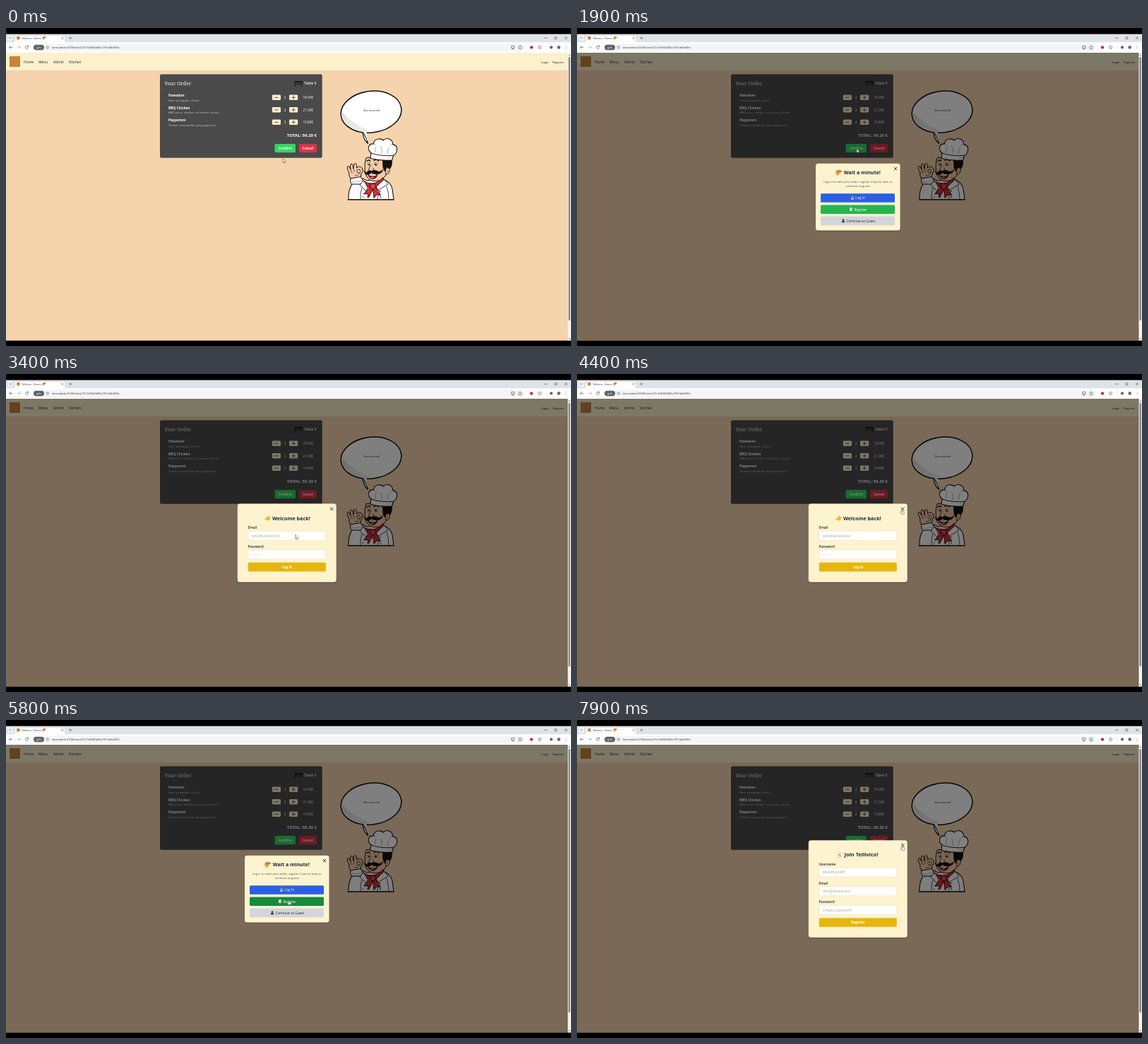
These frames come from a looping animation (800 by 450 pixels, 8 s). An HTML page:

```html
<!DOCTYPE html>
<html lang="en">
<head>
<meta charset="utf-8">
<title>Pizza order</title>
<style>
html, body { margin: 0; width: 100%; height: 100%; overflow: hidden; background: #000; }
svg { display: block; width: 800px; height: 450px; }
text { font-family: "Open Sans", "Noto Sans", sans-serif; white-space: pre; }
.serif { font-family: "Noto Serif", serif; }
.i { font-style: italic; }
</style>
</head>
<body>
<svg id="stage" viewBox="0 0 800 450" xmlns="http://www.w3.org/2000/svg"></svg>
<script>
const LOOP = 8000;
const INK = '#1f2937';

const rect = (x, y, w, h, fill, r = 0, extra = '') =>
  `<rect x="${x}" y="${y}" width="${w}" height="${h}" rx="${r}" fill="${fill}" ${extra}/>`;
const dot = (x, y, r, fill, extra = '') => `<circle cx="${x}" cy="${y}" r="${r}" fill="${fill}" ${extra}/>`;
const shape = (d, fill, stroke = '#111', w = 0.9) =>
  `<path d="${d}" fill="${fill}" stroke="${stroke}" stroke-width="${w}" stroke-linejoin="round" stroke-linecap="round"/>`;
const line = (d, stroke = '#111', w = 0.7) => shape(d, 'none', stroke, w);
const text = (x, y, size, str, fill = '#111', weight = 400, anchor = 'start', cls = '') =>
  `<text x="${x}" y="${y}" font-size="${size}" fill="${fill}" font-weight="${weight}" text-anchor="${anchor}" class="${cls}">${str}</text>`;
const cross = (x, y, r, w, color = '#222') =>
  line(`M${x - r} ${y - r}l${2 * r} ${2 * r}m0 ${-2 * r}l${-2 * r} ${2 * r}`, color, w);

// Buttons that react to the pointer
const buttons = [];
function button(view, x, y, w, h, base, hover, label = '') {
  buttons.push({ id: 'b' + buttons.length, view, x, y, w, h, base, hover });
  return rect(x, y, w, h, base, 1.6, `id="b${buttons.length - 1}"`) + label;
}
function closeButton(view, x, y) {
  return button(view, x - 3, y - 3, 6, 6, 'transparent', 'transparent') + cross(x, y, 2, 0.85);
}

// Small pictograms
const slice = (x, y, s) => `<g transform="translate(${x} ${y}) scale(${s})">` +
  shape('M-4 -1 Q0 -5 4 -2 L-2 4Z', '#f3b33f', '#b5651d', 0.8) +
  line('M-4 -1 Q0 -5 4 -2', '#b5651d', 1.5) + dot(0, -1, 0.9, '#c8322b') + dot(-1.4, 1.4, 0.7, '#c8322b') + '</g>';
const wave = (x, y) => shape(`M${x - 3} ${y + 1}L${x - 1} ${y - 1}L${x + 2} ${y - 3.2}L${x + 3.5} ${y - 1}
  L${x + 3} ${y + 2}Q${x} ${y + 4.5} ${x - 3} ${y + 1}Z`, '#f8c233', '#c98b17', 0.4) +
  line(`M${x} ${y}l2.4 -2M${x + 0.8} ${y + 1}l2.4 -1.6`, '#c98b17', 0.35);
const cook = (x, y) => shape(`M${x - 2.8} ${y + 4}Q${x} ${y + 0.5} ${x + 2.8} ${y + 4}Z`, '#f4f4f4', '#999', 0.3) +
  dot(x, y, 2, '#f6c04a') + shape(`M${x - 2} ${y - 1}l-.4 -2q2.4 -2 4.8 0l-.4 2Z`, '#fff', '#999', 0.3) +
  dot(x + 1.6, y + 2.2, 0.7, '#d03b32');
const lock = (x, y) => line(`M${x - 1.2} ${y}v-1.3a1.2 1.2 0 0 1 2.4 0v1.3`, '#cfd5dc', 0.6) +
  rect(x - 1.9, y - 0.4, 3.8, 2.9, '#f2a93b', 0.4);
const memo = (x, y) => rect(x - 1.8, y - 2.4, 3.6, 4.8, '#f3f3f3', 0.3) +
  line(`M${x - 1} ${y - 1}h2M${x - 1} ${y}h2`, '#888', 0.3) + line(`M${x} ${y + 1.8}l2 -2.4`, '#e0533d', 0.7);
const bust = (x, y) => dot(x, y - 1.2, 1.3, '#333b48') +
  shape(`M${x - 2.4} ${y + 2.4}q0 -2.4 2.4 -2.4t2.4 2.4Z`, '#333b48', 'none', 0);

function browser() {
  let s = rect(0, 8.5, 800, 434, '#fff') + rect(0, 8.5, 800, 11.7, '#dfe2e6');
  s += rect(2, 10.2, 8, 8, '#eef0f3', 2) + line('M5 13.6l1.2 1.2 1.2 -1.2', '#333', 0.6);
  s += shape('M11 20.2q2 0 2 -2v-5q0 -2 2 -2h66q2 0 2 2v5q0 2 2 2Z', '#fff', 'none', 0);
  s += rect(15.2, 12, 4.4, 4.4, '#c8843c') + text(22.3, 15.7, 3.75, 'Tellivico - Demo', '#333') + slice(54, 14.2, 0.55);
  s += cross(80, 14.2, 1.2, 0.5, '#444') + line('M89.4 14.2h3.6m-1.8 -1.8v3.6', '#444', 0.5);
  s += line('M762.5 14.2h3.4', '#222', 0.5) + rect(777, 12.8, 2.8, 2.8, 'none', 0.4, 'stroke="#222" stroke-width=".5"');
  s += cross(793, 14.2, 1.5, 0.5);
  s += line('M9 27.4H4.8m1.9 -2l-2 2 2 2', '#444', 0.6) + line('M16 27.4h4.2m-1.9 -2l2 2 -2 2', '#9a9a9a', 0.6);
  s += line('M31.3 26a2.2 2.2 0 1 0 .4 1.8M31.6 24.8v1.5h-1.5', '#444', 0.6);
  s += rect(37, 22.4, 697, 10.2, '#f2f4f6', 5.1) + rect(39, 23.8, 15, 7.4, '#5f6368', 3.7);
  s += text(46.5, 28.8, 4, 'gifs', '#fff', 400, 'middle');
  s += dot(58.8, 27.4, 1.9, 'none', 'stroke="#555" stroke-width=".45"') + line('M58.8 27.2v1.1M58.8 26.3v.1', '#555', 0.45);
  s += text(65, 28.9, 3.95, 'demotable:4100/ticket/27c1b8340d92e75f1a6b830e', '#333');
  s += rect(715.6, 25.4, 4.2, 3.2, 'none', 0.4, 'stroke="#333" stroke-width=".6"') + line('M716.7 29.9h2', '#333', 0.6);
  s += shape('M728 24.9l.8 1.8 1.9 .2 -1.4 1.3 .4 1.9 -1.7 -1 -1.7 1 .4 -1.9 -1.4 -1.3 1.9 -.2Z', 'none', '#444', 0.5);
  s += dot(744, 27.4, 2.2, '#d3262f') + dot(755.6, 27.4, 2, 'none', 'stroke="#555" stroke-width=".7"');
  s += line('M764 24.5v6', '#ccd', 0.4) + dot(772, 27.4, 2.1, '#6a6259') + dot(782.7, 27.4, 2.3, '#5669a5');
  s += [25.5, 27.4, 29.3].map(y => dot(793, y, 0.45, '#333')).join('');
  return s;
}

function scrollbar() {
  return rect(795.5, 35, 4.5, 407.5, '#f4f4f4') + rect(796.5, 41, 2.4, 373, '#858585', 1.2) +
    shape('M796.5 39l1.2 -1.8 1.2 1.8Z', '#777', 'none', 0) + shape('M796.5 439l1.2 1.8 1.2 -1.8Z', '#777', 'none', 0);
}

function orderCard() {
  const rows = [['Hawaiian', 'Ham, pineapple, cheese', '18.40€'],
    ['BBQ Chicken', 'BBQ sauce, chicken, red onions, cheese', '21.00€'],
    ['Pepperoni', 'Tomato, mozzarella, spicy pepperoni', '19.80€']];
  let s = rect(218, 65.5, 229.7, 118.2, '#4a4a4a', 2);
  s += text(224.5, 80.9, 7.1, 'Your Order', '#f5f5f5', 500, 'start', 'serif');
  s += rect(408, 75.3, 12, 2, '#151515', 0.5) + line('M410 77l-.8 5.2M418 77l.8 5.2M409.7 79.4h8.6', '#151515', 0.9);
  s += text(422, 80.4, 5.2, 'Table 5', '#f5f5f5', 600);
  rows.forEach(([name, note, price], i) => {
    const y = i * 17.5;
    s += text(230, 97.2 + y, 4.8, name, '#fff', 700) + text(230, 103.6 + y, 4.2, note, '#c9c9c9', 400, 'start', 'i');
    s += rect(376.8, 94.6 + y, 12.2, 7.4, '#fcefcb', 1.4) + rect(401, 94.6 + y, 12.2, 7.4, '#fcefcb', 1.4);
    s += line(`M380.6 ${98.3 + y}h4.6M404.9 ${98.3 + y}h4.4m-2.2 -2.2v4.4`, '#3f4658', 0.9);
    s += text(395, 100.2 + y, 4.8, '2', '#fff', 400, 'middle') + text(420.4, 100.1 + y, 4.7, price, '#fff');
  });
  s += text(440, 154.3, 6, 'TOTAL: 59.20 €', '#fff', 700, 'end');
  s += button('order', 380.5, 164, 29.5, 12.2, '#30d961', '#25b34c', text(395.3, 171.8, 4.75, 'Confirm', '#fff', 700, 'middle'));
  s += button('order', 415, 164, 25, 12.2, '#dc3346', '#b92938', text(427.5, 171.8, 4.6, 'Cancel', '#fff', 700, 'middle'));
  return s;
}

function bubble() {
  let s = shape('M503 145Q510 151 512.5 163.5Q505.5 158 505 146', '#fff', '#111', 1.2);
  s += `<ellipse cx="517" cy="118.7" rx="43" ry="29.3" transform="rotate(-7 517 118.7)" fill="#fff" stroke="#111" stroke-width="1.5"/>`;
  s += shape('M504.6 145.5L510 146.5 512 159Q510 151 504.6 145.5Z', '#fff', '#fff', 0.6);
  // shading strokes that follow the lower left rim
  for (let i = 0; i < 20; i++) {
    const a = 3.0 - i * 0.065;
    const x = 517 + 41 * Math.cos(a), y = 119.5 + 28 * Math.sin(a);
    const n = 2.5 + 3.5 * Math.sin(i * Math.PI / 20);
    s += line(`M${x} ${y}l${n * 0.55} ${-n}`, '#555', 0.35);
  }
  s += line('M507 149q3 4 3.6 9M506 150.5q2 4 4.4 7', '#555', 0.35);
  return s + text(517.5, 118.3, 3.95, 'Slice secured!', '#222', 400, 'middle', 'i');
}

function chef() {
  const skin = '#f7c9a3', red = '#d9272e', coat = '#fdfdfd';
  let s = shape('M485 242.8Q484 230 491 219L505 213L511 216L534 214Q545 218 547 228L549 242.8Z', coat, '#111', 1.1);
  s += line('M504 226q-3 8 -2 16M539 224q3 9 3 18M527 236l-1 6.5') + line('M484 243h65', '#111', 1.2);
  s += dot(512, 239, 0.9, '#222') + dot(529.5, 231, 0.9, '#222') + dot(530, 239, 0.9, '#222') + dot(505.5, 239, 0.8, '#222');
  // raised hand with the thumb and finger ring
  s += shape('M490 215Q484 209 486 205Q481.5 197 484 195.5Q486 195 488 200Q486.6 193 489 192.3Q491.4 192 492 199Q492 192 494.4 191.4Q497 192 496.4 198Q501 194 504 198Q507 202 503 206Q503 212 500 215Z', skin, '#111', 1);
  s += dot(499.2, 202.5, 2.5, '#f4d3ad', 'stroke="#111" stroke-width=".8"') + line('M488 200l2 5M492 199l1 4M494 209q4 1 7 -3', '#111', 0.6);
  s += shape('M488 213L502 210.5L505.5 216Q505 220 501 221L489.5 221Q486.5 218 488 213Z', coat, '#111', 1);
  s += line('M489 218q7 1 15 -2', '#777', 0.5);
  // head
  s += shape('M510 184Q507 192 508.5 203Q510 214 519 216.5Q528 218 535 212L541 204L545 188L535 182Z', skin, '#111', 1);
  s += shape('M533 183L546 184.5Q548 195 542 201L541 197Q537 196 536.4 203Q533 198 533.5 191Z', '#111');
  s += shape('M538 199Q543 196 543.4 201Q543 207 538 207Z', skin, '#111', 0.8) + line('M539.6 201.4q2 0 1.4 3', '#111', 0.5);
  s += line('M511 188.2q2.4 -2.4 4.6 -.2M521 187.6q3.4 -2.6 6.5 .4', '#111', 1.4);
  s += '<ellipse cx="513.8" cy="192.6" rx="1.8" ry="2.2" fill="#fff" stroke="#111" stroke-width=".5"/>' +
    '<ellipse cx="524" cy="192.6" rx="2.2" ry="2.3" fill="#fff" stroke="#111" stroke-width=".5"/>';
  s += dot(514, 193, 1.1, '#111') + dot(523.6, 193, 1.2, '#111');
  s += shape('M512.5 206Q519 209 526 205.5Q526 213 519 213.5Q513 212 512.5 206Z', '#8d1720', '#111', 0.8);
  s += shape('M514 206.5Q519 208.6 524.8 206L524 208.4Q519 210 514.6 208.5Z', '#fff', 'none', 0);
  s += shape('M515.6 211.4q3.4 -2.4 6 -.2q-2.6 2.6 -6 .2Z', '#e86a6a', 'none', 0);
  s += shape('M517.4 202Q512 201 510.6 204.5Q508.6 206 507 202Q508 208.4 512 207.4Q516 206.5 517.6 204.8Q522 208 528 206.6Q533 205 534 200Q530.6 203.8 527.8 203.2Q523 200 517.4 202Z', '#111', '#111', 0.4);
  s += shape('M517 194Q512.6 199 514 201.4Q517 203.4 520.4 201.4Q521.4 199 519.6 198', skin, '#111', 0.8);
  s += line('M528.5 199q2 1.4 2.2 3.5', '#b97954', 0.5);
  // scarf
  s += shape('M506 216.5Q512 220.5 519 220Q528 219 533.5 211.5L536 216Q531 224 519 226Q509 225 505.5 221Z', red, '#111', 0.9);
  s += shape('M516 224L506.5 235L512 234.5L513.5 240L520 227Z', red, '#111', 0.9);
  s += shape('M519 225L521 240.5L525 235.8L530.5 236.5L523 223.5Z', red, '#111', 0.9);
  s += shape('M515.4 221.5Q519 219 523 221.4Q524.5 226 520 228Q515 227 515.4 221.5Z', '#ea4148', '#111', 0.8);
  s += [[509.5, 221], [513, 231.5], [526, 231.5], [530, 219], [522, 234]].map(p => dot(...p, 0.5, '#fff')).join('');
  s += shape('M506 216L501 222L510 231L512 225.5Z', coat, '#111', 0.8) + shape('M535.5 214.5L541 221L527 229.5L524.4 225Z', coat, '#111', 0.8);
  // hat
  s += shape('M517 177Q511.5 172 514 167Q516 163.2 520.5 164Q521 157.5 527.5 157Q531.5 156.4 534 159Q538 155 543.5 157.5Q548 160 547.5 164.6Q554 166 553.7 172Q553 178 548.6 180.5L546.5 187Q532 188.5 515.8 184.5Z', '#fff', '#111', 1.1);
  s += line('M516.8 177Q531 182 548.6 180.4', '#111', 0.9) + line('M523 176q-1 -5 1 -8M532 178q1 -6 -1 -10M540 178q0 -5 2.5 -9M520.5 164q2 .4 3 2M547.5 164.6q-2 0 -3.4 1.4', '#666', 0.55);
  s += line('M541 182.5v3.5M543.5 182.4v3.2M546 182v3', '#999', 0.4);
  return s;
}

function page() {
  let s = rect(0, 60, 796, 382.5, '#f4d3ad') + rect(0, 35, 796, 25, '#fcf0cd');
  s += rect(5, 40, 15, 15, '#c8843c');
  [['Home', 25], ['Menu', 46], ['Admin', 67], ['Kitchen', 89.3]].forEach(([str, x]) => s += text(x, 49.7, 4.95, str, INK, 500));
  s += text(758, 49.5, 4.35, 'Login', INK) + text(774, 49.5, 4.3, 'Register', INK);
  return s + orderCard() + bubble() + chef();
}

function panel(x, y, w, h) {
  return rect(x + 0.5, y + 1.5, w, h, '#000', 3.5, 'opacity=".18"') + rect(x, y, w, h, '#fef3cf', 3.5);
}

function askPanel() {
  const mid = 398;
  let s = panel(338, 191.8, 119.6, 94.6) + closeButton('ask', 451, 199);
  s += slice(370.6, 204.6, 0.9) + text(377.8, 207.2, 7.1, 'Wait a minute!', INK, 700);
  s += text(mid, 219, 4.17, "Log in to track your order, register if you're new, or", '#444b57', 400, 'middle');
  s += text(mid, 225.3, 4.17, 'continue as guest.', '#444b57', 400, 'middle');
  s += button('ask', 345, 234.2, 105, 12.6, '#2b60e4', '#1f43cb', lock(390, 240.6) + text(394.3, 242.3, 4.9, 'Log In', '#fff', 500));
  s += button('ask', 345, 250.4, 105, 12.6, '#23b64f', '#178a3d', memo(388, 256.7) + text(392.4, 258.5, 4.8, 'Register', '#fff', 500));
  s += button('ask', 345, 266.6, 105, 12.6, '#d3d5da', '#b4b8c0', bust(377, 272.8) + text(381.4, 274.7, 4.8, 'Continue as Guest', INK, 500));
  return s;
}

function field(y, label, hint) {
  return text(342.6, y, 4.75, label, INK, 600) +
    rect(342.8, y + 2.9, 110, 13, '#fffefa', 1.6, 'stroke="#e2ddcf" stroke-width=".5"') +
    text(348, y + 11.2, 4.75, hint, '#a3a7ae');
}
const submit = (view, y, label) =>
  button(view, 342.8, y, 110, 12.6, '#e6b60f', '#c8970a', text(398, y + 8, 4.75, label, '#fff', 700, 'middle'));

function loginPanel() {
  return panel(327.8, 183.6, 139.9, 111) + closeButton('login', 461.2, 190.8) + wave(370, 204.2) +
    text(377, 206.8, 7.2, 'Welcome back!', INK, 700) + field(219.4, 'Email', 'who@sample.test') +
    field(246, 'Password', '••••••••'.replace(/•/g, '·')) + submit('login', 266.8, 'Log In');
}

function joinPanel() {
  return panel(327.8, 170.3, 139.9, 137.4) + closeButton('join', 461.2, 177.3) + cook(371.3, 190) +
    text(378.6, 193.4, 7.4, 'Join Tellivico!', INK, 700) + field(206.2, 'Username', 'Breadfriend45') +
    field(232.8, 'Email', 'who@sample.test') + field(259.4, 'Password', 'Create a password') + submit('join', 280.2, 'Register');
}

const arrow = shape('M0 0V5.4L1.3 4.3L2.2 6.2L3 5.8L2.2 4L3.9 3.9Z', '#fff', '#222', 0.45);
const hand = shape('M-.6 .4Q0 -.5 .7 .4V2.5L2.6 2.9Q3.5 3.2 3.3 4.4L2.7 6.6H-.5L-2.1 4.2Q-2 3.2 -.6 4Z', '#fff', '#222', 0.45);

const stage = document.getElementById('stage');
stage.innerHTML = browser() + page() +
  `<g id="shade">${rect(0, 35, 796, 407.5, '#000', 0, 'opacity=".5"')}</g>` + scrollbar() +
  `<g id="ask">${askPanel()}</g><g id="login">${loginPanel()}</g><g id="join">${joinPanel()}</g>` +
  rect(0, 0, 800, 8.5, '#000') + rect(0, 442.5, 800, 7.5, '#000') +
  `<g id="pointer"><g id="arrow">${arrow}</g><g id="hand">${hand}</g></g>`;

const $ = id => document.getElementById(id);
const show = (id, on) => $(id).setAttribute('visibility', on ? 'visible' : 'hidden');

const views = [[0, 'order'], [1900, 'ask'], [3050, 'login'], [4550, 'order'], [5250, 'ask'], [5980, 'join']];
// time, x, y of the pointer tip
const path = [[0, 392, 185], [350, 392, 185], [1000, 395.4, 171.2], [1300, 396, 171], [1950, 396, 171],
  [2550, 398, 236.6], [3150, 398, 236.6], [4050, 460, 191.6], [4580, 460, 191.6], [4930, 399.6, 171],
  [5300, 399.6, 171], [5700, 400.5, 255], [6100, 400.5, 255], [7500, 460.5, 178], [8000, 460.5, 178]];

function pointerAt(t) {
  const i = path.findIndex((p, k) => k && t <= p[0]);
  const [t0, x0, y0] = path[i - 1], [t1, x1, y1] = path[i];
  const u = (t - t0) / (t1 - t0), e = u * u * (3 - 2 * u);
  return [x0 + (x1 - x0) * e, y0 + (y1 - y0) * e];
}

function draw(t) {
  const view = views.filter(v => v[0] <= t).pop()[1];
  const [x, y] = pointerAt(t);
  let over = false;
  for (const b of buttons) {
    const hit = b.view === view && x >= b.x && x <= b.x + b.w && y >= b.y && y <= b.y + b.h;
    over = over || hit;
    $(b.id).setAttribute('fill', hit ? b.hover : b.base);
  }
  show('shade', view !== 'order');
  ['ask', 'login', 'join'].forEach(id => show(id, id === view));
  show('arrow', !over);
  show('hand', over);
  $('pointer').setAttribute('transform', `translate(${x} ${y})`);
}

const start = performance.now();
function tick(now) {
  draw(Math.max(0, now - start) % LOOP);
  requestAnimationFrame(tick);
}
draw(0);
requestAnimationFrame(tick);
</script>
</body>
</html>
```
